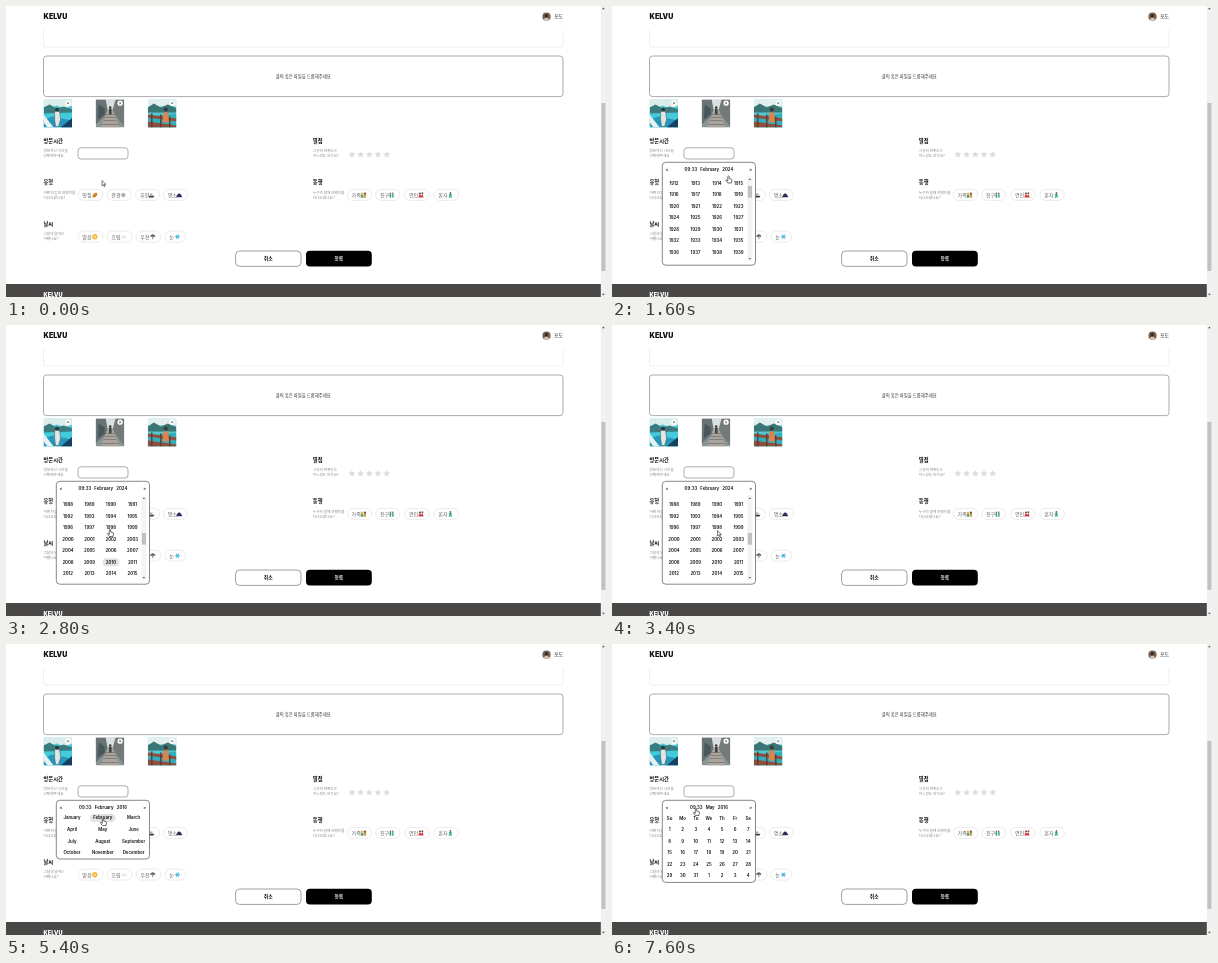
Animation of 600 by 291 pixels, one loop 8000 ms. Source, as an HTML page:

```html
<!DOCTYPE html>
<html>
<head>
<meta charset="utf-8">
<style>
  html, body { margin: 0; width: 100%; height: 100%; overflow: hidden; background: #fff; }
  svg { display: block; width: 100%; height: 100%; }
  text { font-family: "Noto Sans CJK KR", "Noto Sans CJK", sans-serif; }
  .latin { font-family: Inter, "Liberation Sans", sans-serif; font-weight: 600; }
  .brand { font-family: Inter, "Liberation Sans", sans-serif; font-weight: 900; }
  .head { word-spacing: 2px; }
</style>
</head>
<body>
<svg viewBox="0 0 600 291">
  <defs>
    <clipPath id="listClip"><rect x="51" y="170.5" width="90" height="84.5"/></clipPath>
    <clipPath id="thumbClip"><rect width="28.4" height="28"/></clipPath>
  </defs>
  <g id="page"></g>
  <g id="popup"></g>
  <g id="cursor"></g>
</svg>
<script>
const STEP = 200, LOOP = 8000, ROW = 11.55;
const $ = id => document.getElementById(id);

const rect = (x, y, w, h, r, fill, stroke = 'none', sw = .7) =>
  `<rect x="${x}" y="${y}" width="${w}" height="${h}" rx="${r}" fill="${fill}" stroke="${stroke}" stroke-width="${sw}"/>`;
const path = (d, fill, stroke = 'none', sw = .7) =>
  `<path d="${d}" fill="${fill}" stroke="${stroke}" stroke-width="${sw}" stroke-linejoin="round"/>`;
const dot = (x, y, r, fill) => `<circle cx="${x}" cy="${y}" r="${r}" fill="${fill}"/>`;
const at = (x, y, body, extra = '') => `<g transform="translate(${x} ${y})" ${extra}>${body}</g>`;
// y is the optical middle of the line
const text = (s, x, y, size, { anchor = 'start', fill = '#111', weight = 400, cls = '' } = {}) =>
  `<text x="${x}" y="${y + size * .36}" font-size="${size}" text-anchor="${anchor}" fill="${fill}"` +
  (cls ? ` class="${cls}"` : ` font-weight="${weight}"`) + `>${s}</text>`;
const label = (s, x, y) => text(s, x, y, 4.35, { anchor: 'middle', cls: 'latin' });

// ---------- static page ----------
const icons = {
  bread: path('M-2.6 1.6Q-2 -2 1.5 -2.4Q3 -1.6 2.4 .2Q.6 3 -1.6 2.6Z', '#d9903d') + path('M-1 1.5L1.8 -1', 'none', '#8d4f25'),
  wheel: dot(0, 0, 2.3, '#c9c5c5') + path('M-2 0H2M0 -2V2', 'none', '#8e8b8b', .6),
  ship: path('M-3 .8H3L2 2.6H-2.3Z', '#35394a') + path('M-1.3 .4V-1.5H1V.4Z', '#a8a3a3'),
  hill: path('M-3.2 2.2Q-1.5 -1.6 0 -1.8Q1.8 -1.5 3.2 2.2Z', '#2b2d5b'),
  family: dot(-1.5, -1.3, 1.2, '#e4b63a') + dot(1.4, -1.3, 1.2, '#7d5b3a') + rect(-2.7, 0, 2.6, 2.7, .5, '#5d9d79') + rect(.2, 0, 2.5, 2.7, .5, '#d1a650'),
  friends: dot(-1.1, -1.8, .8, '#5d6b58') + dot(1.2, -1.8, .8, '#5d6b58') + rect(-2, -1, 1.6, 3.7, .4, '#359b83') + rect(.5, -1, 1.6, 3.7, .4, '#4aac8e'),
  couple: dot(-1, -1.5, 1, '#6d3b30') + dot(1.4, -1.7, 1, '#8f5038') + path('M-2.7 2.5L-1.6 -.6L.2 .4L1.6 -.8L2.6 2.5Z', '#d83a43'),
  walker: dot(.2, -2, .9, '#6f6a50') + path('M.1 -1L-1.2 .4M.1 -1V.8L-1.2 2.7M.1 .8L1.5 2.6M.1 -.8L1.6 .2', 'none', '#2faa74', 1.1),
  sun: dot(0, 0, 2.7, '#f5b13c') + dot(0, 0, 1.5, '#ffd979'),
  cloud: path('M-2.6 1.5Q-3.2 -.4 -1.4 -.5Q-.6 -2.3 1 -1.2Q2.9 -1.2 2.7 1.5Z', '#e6e9ed'),
  umbrella: path('M-2.8 .1Q-2 -2.6 0 -2.5Q2 -2.6 2.8 .1Z', '#59636d') + path('M0 0V2.5', 'none', '#59636d', .8),
  snow: dot(0, 0, 1.4, '#a8dff1') + path('M-2.6 0H2.6M-1.3 -2.3L1.3 2.3M1.3 -2.3L-1.3 2.3', 'none', '#45b4db', .9)
};

function chip(x, y, w, s, icon) {
  return rect(x, y, w, 11, 5.5, '#fff', '#dedede', .6) +
    text(s, x + 4.3, y + 5.6, 5.1, { fill: '#666' }) +
    at(x + w - 8.2, y + 5.6, icons[icon]);
}

function section(x, y, title, lines) {
  return text(title, x, y, 5.3, { weight: 700 }) +
    lines.map((s, i) => text(s, x, y + 10.2 + i * 5.3, 3.65, { fill: '#888' })).join('');
}

function star(cx, cy) {
  const points = Array.from({ length: 10 }, (_, i) => {
    const r = i % 2 ? 1.75 : 3.7, a = i * Math.PI / 5 - Math.PI / 2;
    return (cx + r * Math.cos(a)).toFixed(2) + ' ' + (cy + r * Math.sin(a)).toFixed(2);
  });
  return path('M' + points.join('L') + 'Z', '#dcdcdc');
}

const thumbs = [
  rect(0, 0, 29, 28, 0, '#43cbdc') + path('M0 0H29V6L21 9L13 6L5 9L0 7Z', '#dcecea') +
    path('M0 8L6 5L13 9L20 7L29 10V13L0 14Z', '#397d80') + path('M0 20L9 17L29 21V28H0Z', '#2596bc') +
    path('M0 15L10 28H4L0 23Z', '#e8f1ee') + path('M17 28L29 18V28Z', '#173f60') +
    dot(13.5, 10, 2, '#33373a') + path('M10.5 13L6 11M11 12H16L17 20L15 27H12L11 20ZM16 13L21 10', '#e0e7e6', '#4d6464', .6),
  rect(0, 0, 29, 28, 0, '#899595') + path('M0 0H10L12 14L0 25Z', '#687375') + path('M10 0H20L17 10H12Z', '#d9e0df') +
    path('M20 0H29V28L17 12Z', '#737a78') + path('M12 10H17L24 28H5Z', '#aaa49c') +
    path('M10 15H19M9 18H20M8 21H21M6 25H23', 'none', '#797672', .8) + path('M3 5L9 9V15L2 20Z', '#48575b') +
    dot(14.5, 8, 1.2, '#333') + rect(13.3, 9, 2.6, 6, .6, '#424548'),
  rect(0, 0, 29, 28, 0, '#55c8d2') + rect(0, 0, 29, 7, 0, '#e3eeee') +
    path('M0 8L6 4L13 8L20 5L29 9V13H0Z', '#3a7774') + path('M0 17L29 14V28H0Z', '#30afc0') +
    path('M0 15L29 19V22L0 18ZM0 22L29 26V28H0Z', '#8e4f3c') +
    path('M4 14V28M13 15V28M22 17V28', 'none', '#63392f', 1.4) +
    dot(18, 10, 2, '#40393a') + path('M15.5 13H20.5L21 23H15Z', '#d9854f')
];

function drawPage() {
  const gray = '#888';
  const brand = (y, size, fill) => text('KELVU', 37.6, y, size, { cls: 'brand', fill });
  const middle = { anchor: 'middle', weight: 700 };
  return [
    brand(10.6, 7, '#111'),
    dot(540.5, 10.7, 4.1, '#77604f'), dot(540.3, 9.7, 1.6, '#2d2926'), path('M537.6 13.6Q540.4 9.8 543.3 13.6Q540.5 16 537.6 13.6Z', '#d8c8b8'),
    text('포도', 548, 10.6, 5, { fill: '#333' }),
    path('M37.5 24V39Q37.5 41 39.5 41H555Q557 41 557 39V24', 'none', '#e9e9e9'),
    rect(37.5, 50, 519.5, 40.6, 3, '#fff', gray),
    text('클릭 혹은 파일을 드롭해주세요', 297.3, 70.4, 4.35, { anchor: 'middle', fill: '#333' }),
    ...thumbs.map((art, i) => at(37.6 + i * 52.1, 93.5, at(0, 0, art, 'clip-path="url(#thumbClip)"') +
      dot(24.4, 3.7, 2.6, '#fff') + path('M23.5 2.8L25.3 4.6M25.3 2.8L23.5 4.6', 'none', '#333', .6))),
    section(37.5, 134.6, '방문시간', ['방문하신 시간을', '선택해주세요']),
    section(306.8, 134.6, '별점', ['그곳의 만족도는', '어느정도 인가요?']),
    section(37.5, 176.1, '유형', ['어떤 타입의 여행지를', '다녀오셨나요?']),
    section(306.8, 176.1, '동행', ['누구와 함께 여행지를', '다녀오셨나요?']),
    section(37.5, 217.6, '날씨', ['그날의 날씨는', '어땠나요?']),
    rect(72, 141.8, 50, 11.2, 3, '#fff', '#8c8c8c'),
    ...[0, 1, 2, 3, 4].map(i => star(345.9 + i * 8.7, 148.6)),
    chip(72, 183.4, 25, '맛집', 'bread'), chip(101, 183.4, 24.5, '관광', 'wheel'),
    chip(129.6, 183.4, 24, '휴양', 'ship'), chip(157.4, 183.4, 24, '명소', 'hill'),
    chip(341.3, 183.4, 24.4, '가족', 'family'), chip(369.6, 183.4, 24.2, '친구', 'friends'),
    chip(398.6, 183.4, 24.6, '연인', 'couple'), chip(428, 183.4, 24.4, '혼자', 'walker'),
    chip(72, 225.1, 25, '맑음', 'sun'), chip(101, 225.1, 25, '흐림', 'cloud'),
    chip(130, 225.1, 25, '우천', 'umbrella'), chip(159, 225.1, 20.6, '눈', 'snow'),
    rect(229.6, 245, 65.4, 15.4, 4, '#fff', '#777'), text('취소', 262.2, 252.7, 4.8, middle),
    rect(300, 244.8, 65.8, 15.8, 4, '#000'), text('등록', 332.8, 252.7, 4.8, { ...middle, fill: '#fff' }),
    rect(0, 278, 595, 13, 0, '#4a4747'), brand(288.7, 5.6, '#fff'),
    rect(594.8, 0, 5.2, 291, 0, '#f1f1f1'), rect(595.4, 97, 4, 168, 0, '#c1c1c1'),
    path('M596 3.2L597.4 1.6L598.8 3.2Z', '#555'), path('M596 287.8L597.4 289.4L598.8 287.8Z', '#555')
  ].join('');
}

// ---------- timeline ----------
const pointerPath = [
  [0, 96, 174.5], [200, 96, 172], [800, 97, 148], [1200, 103, 149], [1600, 116.5, 170],
  [2000, 105, 200], [2800, 104, 204.5], [3600, 106, 206], [4200, 129, 219], [4600, 62, 228],
  [4800, 62, 226], [5400, 97, 174.5], [5800, 143, 167], [6000, 136, 180], [6600, 83, 186],
  [6800, 96, 185], [7200, 97, 186], [7600, 84, 164.5]
];
// wheel notches of the year list
const wheel = [[1600, 0], [2600, 8], [2800, 7], [3000, 6], [3200, 6], [3600, 8]];
const views = [[0, 'closed'], [1000, 'days', 'February', 2024], [1600, 'years', 'February', 2024],
  [4600, 'months', 'February', 2016], [7000, 'days', 'May', 2016]];

function sample(track, t) {
  const i = track.findIndex(k => k[0] > t);
  if (i < 0) return track[track.length - 1].slice(1);
  if (i === 0) return track[0].slice(1);
  const [a, b] = [track[i - 1], track[i]], p = (t - a[0]) / (b[0] - a[0]);
  return a.slice(1).map((v, n) => v + (b[n + 1] - v) * p);
}
const scrollAt = t => sample(wheel, t)[0] * 31;

// ---------- date picker ----------
const MONTHS = ['January', 'February', 'March', 'April', 'May', 'June', 'July',
  'August', 'September', 'October', 'November', 'December'];
const WEEK = ['Su', 'Mo', 'Tu', 'We', 'Th', 'Fr', 'Sa'];
const grids = {
  days: { x: 57.6, y: 185.5, dx: 13.1, cols: 7, w: 11, bottom: 238.4 },
  months: { x: 66, y: 173.9, dx: 30.8, cols: 3, w: 25.4, bottom: 215 },
  years: { x: 62, y: 177, dx: 21.5, cols: 4, w: 17, bottom: 259.2 }
};

function cellLabels(view, month, year) {
  if (view === 'months') return MONTHS;
  if (view === 'years') return Array.from({ length: 188 }, (_, i) => 1912 + i);
  const m = MONTHS.indexOf(month), lead = new Date(year, m, 1).getDay();
  return Array.from({ length: 35 }, (_, i) => new Date(year, m, 1 - lead + i).getDate());
}

function drawPicker(t, px, py) {
  const [, view, month, year] = views.filter(v => v[0] <= t).pop();
  if (view === 'closed') return { svg: '', hand: false };
  const g = grids[view], isList = view === 'years';
  const scroll = isList ? scrollAt(t) : 0;
  // the highlight trails the scroll by one step
  const hoverScroll = isList ? scrollAt(t - STEP) : 0;
  let cells = '', hover = false;
  cellLabels(view, month, year).forEach((s, i) => {
    const x = g.x + i % g.cols * g.dx, rowY = g.y + Math.floor(i / g.cols) * ROW, y = rowY - scroll;
    if (isList && (y < 160 || y > 265)) return;
    if (py > 171 && Math.abs(px - x) < g.w / 2 && Math.abs(py - rowY + hoverScroll) < 4.4) {
      hover = true;
      cells += rect(x - g.w / 2, y - 4, g.w, 8, 4, '#e2e2e2');
    }
    cells += label(s, x, y);
  });
  let extra = '';
  if (view === 'days') extra = WEEK.map((s, i) => label(s, g.x + i * g.dx, 174)).join('');
  if (isList) extra = rect(135.4, 170.5, 5, 84.5, 0, '#f4f4f4') +
    rect(135.8, 180 + scroll / 7.75, 4.2, 11.6, 0, '#c1c1c1') +
    path('M136.6 174L137.9 172.4L139.2 174Z', '#555') + path('M136.6 252L137.9 253.6L139.2 252Z', '#555');
  const svg = rect(50.3, 156.3, 93.2, g.bottom - 156.3, 3.5, '#fff', '#555') +
    label('&lt;', 55, 163.4) + label('&gt;', 138.7, 163.4) +
    text(`09:33 ${month} ${year}`, 97, 163.4, 4.35, { anchor: 'middle', cls: 'latin head' }) +
    (isList ? `<g clip-path="url(#listClip)">${cells}</g>` : cells) + extra;
  return { svg, hand: hover || (py > 157 && py < 171) };
}

const ARROW = path('M0 0V5.3L1.3 4.2L2.2 6.1L3.1 5.7L2.2 3.8H3.9Z', '#fff', '#111', .55);
const HAND = path('M-.7 .4Q0 -.5 .7 .4V2.6L3 3.1Q3.7 3.4 3.5 4.2L2.9 7H-.7L-2.6 4.4Q-2.4 3.5 -1.5 4L-.7 4.8Z', '#fff', '#111', .6);

// ---------- playback ----------
let shown = -1;
function frame(now) {
  const t = Math.min(Math.floor(now % LOOP / STEP) * STEP, 7600);
  if (t !== shown) {
    shown = t;
    const [x, y] = sample(pointerPath, t);
    const { svg, hand } = drawPicker(t, x, y);
    $('popup').innerHTML = svg;
    $('cursor').innerHTML = at(x, y, hand ? HAND : ARROW);
  }
  requestAnimationFrame(frame);
}
$('page').innerHTML = drawPage();
frame(performance.now());
</script>
</body>
</html>
```
